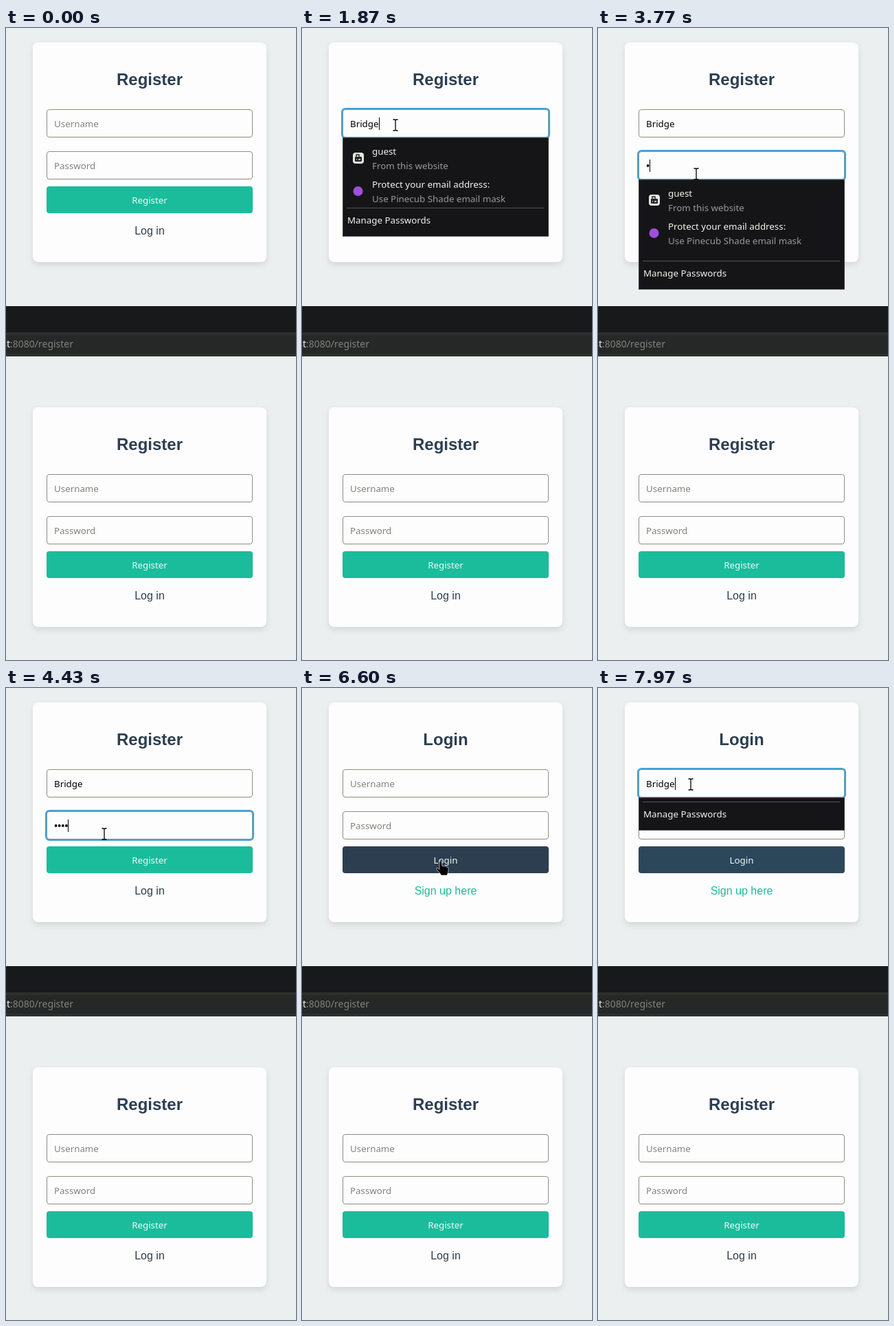
Write an HTML page that moves like this. It is 422x918 px and loops after 8000 ms.

```html
<!DOCTYPE html>
<html lang="en">
<head>
<meta charset="utf-8">
<title>Register and log in</title>
<style>
  html, body { margin: 0; width: 100%; height: 100%; overflow: hidden; background: #ebeff0; }
  svg { display: block; width: 100%; height: 100%; }
  text { font: 13.333px "Noto Sans", sans-serif; }
  .title { font: bold 24px "Liberation Sans", Arial, sans-serif; fill: #2c3e50; text-anchor: middle; }
  .link { font: 16px "Liberation Sans", Arial, sans-serif; fill: #2c3e48; text-anchor: middle; }
  .label { fill: #f0fbf8; text-anchor: middle; }
  .hint { fill: #82827c; }
  .card { fill: #fdfdfe; filter: drop-shadow(0 4px 4px rgba(0, 0, 0, .1)); }
  .field { fill: #fdfdfe; stroke: #8e8e7c; }
  .ring { fill: none; stroke: #48a2d6; stroke-width: 2.5; }
  .caret { fill: #000; }
  .menu { fill: #151518; stroke: #45453c; }
  .rule { fill: #525250; }
  .main { fill: #f3f3ee; }
  .sub { fill: #999994; }
  .url { font-size: 14px; }
</style>
</head>
<body>
<svg id="stage" viewBox="0 0 422 918" preserveAspectRatio="none" xmlns="http://www.w3.org/2000/svg"></svg>
<script>
const LOOP = 8000, TEAL = '#1abc9c', ORANGE = '#e67e22';
const NAME = 'Bridge';
const stage = document.getElementById('stage');

const rect = (x, y, w, h, attrs = '') =>
  `<rect x="${x}" y="${y}" width="${w}" height="${h}" ${attrs}/>`;
const text = (x, y, cls, str, id = '') =>
  `<text x="${x}" y="${y}" class="${cls}" id="${id}">${str}</text>`;

// id prefix p keeps the two cards apart
const card = (p, dy) => `<g transform="translate(0 ${dy})">
  ${rect(39, 21, 340, 319, 'rx="8" class="card"')}
  ${text(209, 83, 'title', 'Register', p + 'Title')}
  ${rect(59.5, 118.5, 299, 40, 'rx="3.5" class="field"')}
  ${text(70, 144, 'hint', 'Username', p + 'User')}
  ${rect(59.5, 179.5, 299, 40, 'rx="3.5" class="field"')}
  ${text(70, 205, 'hint', 'Password', p + 'Pass')}
  ${rect(59, 230, 300, 39, `rx="4" fill="${TEAL}" id="${p}Button"`)}
  ${text(209, 255, 'label', 'Register', p + 'Label')}
  ${text(209, 300, 'link', 'Log in', p + 'Link')}
</g>`;

const addressBar = `
  ${rect(0, 404, 422, 73, 'fill="#18191b"')}
  ${rect(0, 442, 422, 35, 'fill="#2d2f2c"')}
  ${rect(0, 446, 422, 27, 'fill="#262727"')}
  <text x="6" y="464" class="url main" text-anchor="end">st</text>
  ${text(6, 464, 'url hint', ':8080/register')}`;

const menuFoot = h => rect(65, h - 42, 287, 1, 'class="rule"') +
  text(66, h - 19, 'main', 'Manage Passwords');

const fullMenu = (id, y, h) => `<g id="${id}" transform="translate(0 ${y})">
  ${rect(59.5, .5, 299, h - 1, 'class="menu"')}
  ${rect(74, 22, 16, 16, 'rx="4" fill="#e4e7e0"')}
  ${rect(77, 28, 10, 7, 'rx="1" fill="#26262a"')}
  <path d="M79 28v-3h4v3" fill="none" stroke="#26262a" stroke-width="1.4"/>
  <path d="M79 32h1M82 32h3" stroke="#e4e7e0" stroke-width="1.3"/>
  ${text(102, 25, 'main', 'guest')}
  ${text(102, 46, 'sub', 'From this website')}
  <circle cx="81.5" cy="78" r="7" fill="#a04fdc"/>
  ${text(102, 73, 'main', 'Protect your email address:')}
  ${text(102, 94, 'sub', 'Use Pinecub Shade email mask')}
  ${menuFoot(h)}
</g>`;

const smallMenu = `<g id="small" transform="translate(0 159)">
  ${rect(59.5, .5, 299, 47, 'class="menu"')}
  ${menuFoot(48)}
</g>`;

const dots = [0, 1, 2, 3].map(i =>
  `<circle class="dot" cx="${72.6 + i * 5.1}" cy="200" r="1.9"/>`).join('');

const pointer = `<g id="pointer">
  <path id="beam" d="M-3.5 -8H-1L0 -7L1 -8H3.5M0 -7V7M-3.5 8H-1L0 7L1 8H3.5" fill="none" stroke="#000" stroke-width="1.3"/>
  <path id="arrow" d="M0 0V16L4 12.5L6.5 18L9 17L6.5 11.5H11.5Z" stroke="#fff"/>
  <path id="hand" d="M-1 1Q-1 -1 .5 -1Q2 -1 2.3 1L3 7Q5 5.5 6 7.2Q8 6 9 8Q12 7.2 12 10V14Q11.5 16.5 10 20H1.5Q0 16.5 -4 13Q-6.5 10.5 -5 9.6Q-3.5 9 -1 11.5Z" stroke="#fff" stroke-width=".6"/>
</g>`;

stage.innerHTML = card('top', 0) + card('low', 530) +
  rect(58.2, 117.2, 301.6, 42.6, 'rx="5" class="ring" id="ringUser"') +
  rect(58.2, 178.2, 301.6, 42.6, 'rx="5" class="ring" id="ringPass"') +
  dots + rect(0, 130, 1, 18, 'class="caret" id="caret"') +
  fullMenu('userMenu', 159, 144) + fullMenu('passMenu', 220, 160) + smallMenu +
  `<path id="status" d="M0 380.5H20Q21.5 380.5 21.5 382V404H0Z" fill="#282c2a" stroke="#484c48"/>` +
  addressBar + pointer;

const el = {};
stage.querySelectorAll('[id]').forEach(n => { if (n.id) el[n.id] = n; });
const dotEls = stage.querySelectorAll('.dot');

const show = (node, on) => node.setAttribute('visibility', on ? 'visible' : 'hidden');
const set = (node, str) => { if (node.textContent !== str) node.textContent = str; };
const clamp = (v, a, b) => Math.min(b, Math.max(a, v));
const typed = (t, from, to, n) => clamp(Math.ceil((t - from) / (to - from) * n), 0, n);

// pointer way points: time, x, y
const path = [
  [870, 414, 282], [1030, 376, 215], [1200, 250, 152], [1430, 136, 141],
  [2370, 136, 141], [2600, 114, 185], [2830, 100, 219], [3100, 100, 213],
  [3230, 100, 213], [3370, 143, 212], [4430, 143, 212], [4800, 201, 252],
  [6600, 201, 252], [7070, 183, 151], [7430, 183, 151], [7830, 135, 140], [8000, 135, 140]
];

function place(t) {
  const i = path.findIndex(p => p[0] > t);
  const [t0, x0, y0] = path[i - 1], [t1, x1, y1] = path[i];
  let k = (t - t0) / (t1 - t0);
  k = k * k * (3 - 2 * k);
  return [x0 + (x1 - x0) * k, y0 + (y1 - y0) * k];
}

function movePointer(t, small) {
  let kind = '';
  if (t >= path[0][0]) {
    const [x, y] = place(t);
    const within = (a, b) => x > 59 && x < 359 && y >= a && y <= b;
    const covered = small && within(159, 207);
    kind = within(230, 269) ? 'hand'
      : !covered && (within(118, 159) || within(179, 220)) ? 'beam' : 'arrow';
    el.pointer.setAttribute('transform', `translate(${x.toFixed(1)} ${y.toFixed(1)})`);
  }
  for (const k of ['beam', 'arrow', 'hand']) show(el[k], k === kind);
  return kind;
}

function draw(t) {
  const login = t >= 6000;
  const focusUser = t >= 1800 && t < 3030 || t >= 7030;
  const focusPass = t >= 3030 && t < 5100;
  const small = t >= 1930 && t < 3000 || t >= 7930;

  const letters = login ? typed(t, 7800, 7900, 6) : typed(t, 1800, 1865, 6);
  set(el.topUser, letters ? NAME.slice(0, letters) : 'Username');
  el.topUser.style.fill = letters ? '#000' : '';

  const count = login ? 0 : typed(t, 3770, 3965, 4);
  show(el.topPass, !count);
  dotEls.forEach((d, i) => show(d, i < count));

  show(el.ringUser, focusUser);
  show(el.ringPass, focusPass);
  show(el.caret, focusUser || focusPass);
  const caretX = focusPass ? 70 + count * 5.1
    : 70 + (letters ? el.topUser.getComputedTextLength() : 0);
  el.caret.setAttribute('x', Math.round(caretX));
  el.caret.setAttribute('y', focusPass ? 191 : 130);

  show(el.userMenu, t >= 1800 && t < 1930 || t >= 7170 && t < 7930);
  show(el.passMenu, t >= 3070 && t < 3830);
  show(el.small, small);
  show(el.status, t >= 5570 && t < 5970);

  const kind = movePointer(t, small);
  set(el.topTitle, login ? 'Login' : 'Register');
  set(el.topLabel, login ? 'Login' : 'Register');
  set(el.topLink, login ? 'Sign up here' : 'Log in');
  el.topLink.style.fill = login ? TEAL : '';
  const loginFill = t < 7430 ? '#2c3e50' : '#2c475a';
  el.topButton.setAttribute('fill', login ? loginFill : kind === 'hand' ? ORANGE : TEAL);
}

const start = performance.now();
function frame() {
  draw((performance.now() - start) % LOOP);
  requestAnimationFrame(frame);
}
frame();
</script>
</body>
</html>
```
